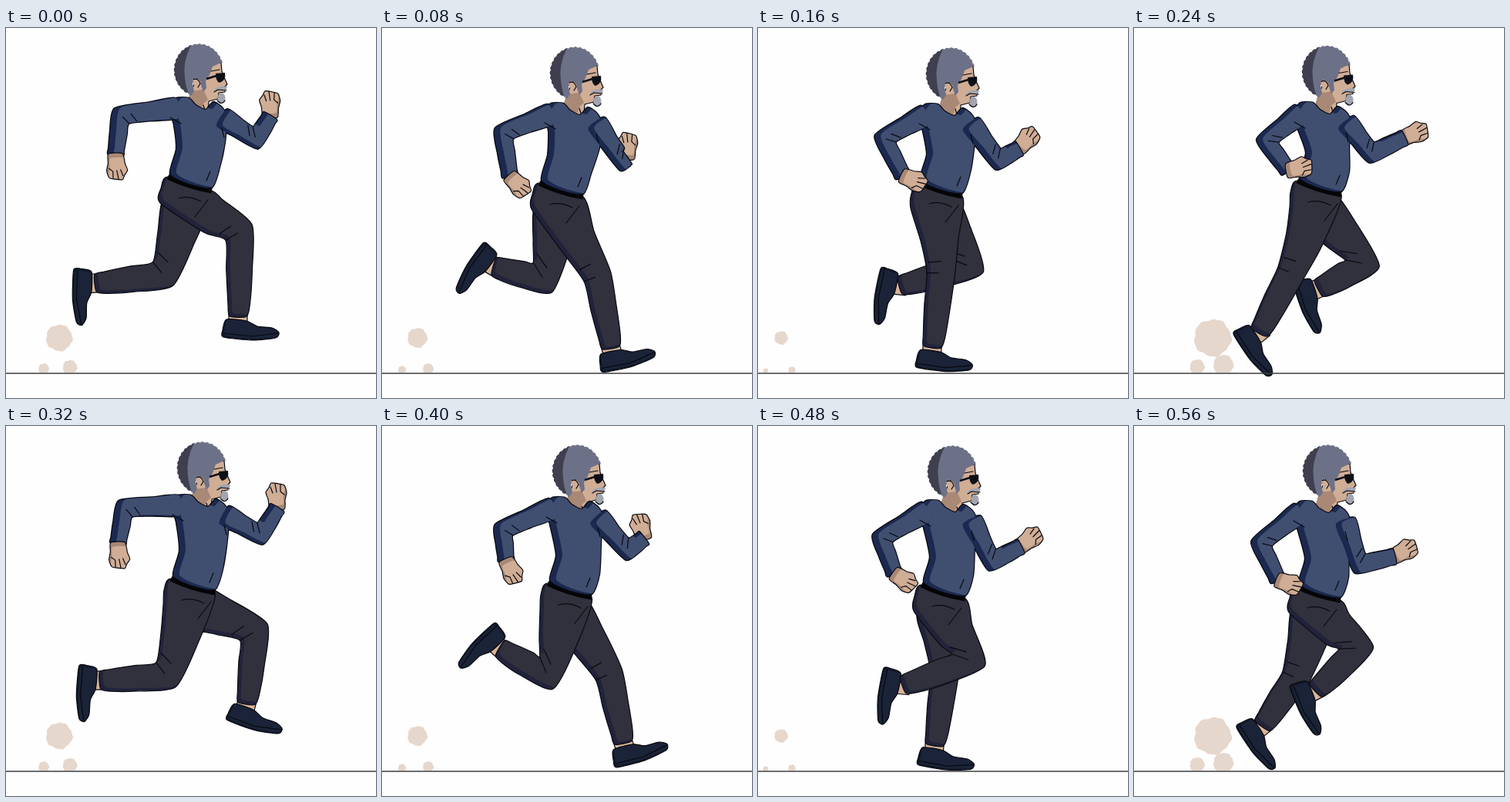
Animation of 480x480 px, one loop 0.64 s. Source, as an HTML page:

```html
<!DOCTYPE html>
<html lang="en">
<head>
<meta charset="utf-8">
<title>Running man</title>
<style>
html, body { margin: 0; height: 100%; overflow: hidden; background: #fefefe; }
svg { display: block; width: 100%; height: 100%; }
.pose { visibility: hidden; animation: show 640ms step-end infinite; animation-delay: calc(var(--i) * 80ms - 640ms); }
@keyframes show { 0% { visibility: visible; } 12.5%, 100% { visibility: hidden; } }
.ink { fill: none; stroke: #08090f; stroke-width: 1.2; stroke-linejoin: round; stroke-linecap: round; }
.rim { stroke-width: 2.4; }
.band { fill: none; stroke: #050507; stroke-width: 7; }
</style>
</head>
<body>
<svg id="stage" viewBox="0 0 480 480"></svg>
<script>
// Material: lit colour, shaded colour, offset of the lit copy.
const knit = ['#404e70', '#1b2950', 8, -1];
const cloth = ['#31313d', '#20233a', 5, -4];
const leather = ['#1a2337', '#10182a', 3, -2];
const skin = ['#d0ad95', '#a98875', 6, -2];

const stage = document.getElementById('stage');
let clips = 0, frames = 0;

const add = ([x, y], dx, dy) => [x + dx, y + dy];
const mix = (a, b, t) => [a[0] + (b[0] - a[0]) * t, a[1] + (b[1] - a[1]) * t];
const unit = (a, b) => {
  const l = Math.hypot(b[0] - a[0], b[1] - a[1]) || 1;
  return [(b[0] - a[0]) / l, (b[1] - a[1]) / l];
};

// Closed curve through the points, tight enough to keep cuffs crisp.
function curve(p, k = 0.11) {
  const at = i => p[(i + p.length) % p.length];
  const pull = (a, from, to) => add(a, (to[0] - from[0]) * k, (to[1] - from[1]) * k);
  return 'M' + p[0] + p.map((a, i) => {
    const b = at(i + 1);
    return `C${pull(a, at(i - 1), b)} ${pull(b, at(i + 2), a)} ${b}`;
  }).join('') + 'Z';
}

const fill = (d, color) => `<path d="${d}" fill="${color}"/>`;
const ink = (d, extra = '') => `<path class="ink ${extra}" d="${d}"/>`;

function shaded(d, [light, dark, dx, dy]) {
  const id = 'c' + clips++;
  return `<clipPath id="${id}"><path d="${d}"/></clipPath><g clip-path="url(#${id})">${fill(d, dark)}` +
    `<path d="${d}" fill="${light}" transform="translate(${dx} ${dy})"/></g>`;
}
const part = (d, material) => shaded(d, material) + ink(d);

// Both edges of a bent limb, from half widths at root, middle, joint, middle, cuff and end.
function limb(a, b, c, widths, folds = 0) {
  const d1 = unit(a, b), d2 = unit(b, c), sum = unit([0, 0], add(d1, ...d2));
  const bend = Math.sign(d1[0] * d2[1] - d1[1] * d2[0]);
  const miter = 1 / Math.max(0.68, sum[0] * d1[0] + sum[1] * d1[1]);
  const stations = [[a, d1], [mix(a, b, 0.5), d1], [b, sum], [mix(b, c, 0.45), d2], [mix(b, c, 0.85), d2], [c, d2]];
  const edge = side => stations.map(([p, d], i) => {
    const fold = i > 0 && i < 5 ? folds * Math.sin(i * 2.6 + side) : 0;
    const w = side * (widths[i] * (i === 2 && side === bend ? miter : 1) + fold);
    return add(p, -d[1] * w, d[0] * w);
  });
  const inner = edge(bend || 1)[2];
  return {
    back: edge(1),
    front: edge(-1).reverse(),
    crease: `M${inner}L${mix(inner, b, 0.8)}M${mix(inner, a, 0.16)}L${mix(b, a, 0.18)}`
  };
}

const placed = (p, angle, content) => `<g transform="translate(${p}) rotate(${angle})">${content}</g>`;

const shoeShape = curve([[-15, 4], [11, 6], [25, 13], [44, 15], [53, 21], [49, 28], [19, 31], [-19, 27], [-20, 18]]);
const shoe = (p, angle) => placed(p, angle,
  fill('M-12 -9H12V9H-12Z', '#d8b49b') + ink('M-12 -9V7M12 -9V8') +
  part(shoeShape, leather) + ink('M-18 22L18 26L52 22'));

const handShape = curve([[-2, -9], [11, -12], [20, -15], [26, -11], [32, -8], [31, 2], [29, 9], [20, 12], [10, 10], [-2, 9]]);
const hand = (p, angle) => placed(p, angle,
  part(handShape, skin) + ink('M27 -9L19 -6M31 -3L20 -1M30 4L21 4L17 9'));

function leg(hip, knee, ankle, angle, waist) {
  const { back, front, crease } = limb(hip, knee, ankle, [28, 24, 19, 16, 15, 11], 1.6);
  const outline = waist
    ? [waist.back, add(waist.back, -9, 15), add(waist.back, -10, 34), ...back.slice(1), ...front.slice(0, -1), waist.front]
    : [...back, ...front];
  return shoe(ankle, angle) + part(curve(outline), cloth) + ink(crease);
}

function hair(to) {
  let d = '';
  for (let a = 118; a <= to; a += 11.4) {
    const r = a * Math.PI / 180;
    const x = 250 + 31 * Math.cos(r), y = 54.5 + 33 * Math.sin(r);
    d += `${d ? 'A4.5 4.5 0 0 1 ' : 'M'}${x.toFixed(1)} ${y.toFixed(1)}`;
  }
  return d;
}

const faceShape = 'M255 48L279 45L280 56L283 64L287 73L283 77L284 83L276 84L275 92L263 95L262 108L252 112L236 97L241 80Z';
const headArt =
  fill(faceShape, '#d0ad95') + ink(faceShape) +
  fill('M240 82L256 80L262 93L256 98L252 112L235 97Z', '#a98875') +
  fill(hair(346) + 'L279 45L268 50L264 61L259 69L260 78L256 83L253 74L247 64L242 72L244 82L240 88Z', '#6d7187') +
  fill(hair(256) + 'L240 22Q229 44 232 64Q233 77 238 88Z', '#3f3f4f') +
  fill('M242 67Q249 63 253 71Q252 78 245 78Z', '#d0ad95') +
  '<ellipse cx="279.5" cy="91" rx="5" ry="7" fill="#a2a5b0"/>' +
  fill('M269 82Q274 74 287 76L285 82L278 80Z', '#a2a5b0') +
  ink('M243 67Q249 64 252 72L249 77M266 56L277 54M270 83L275 80L286 81M274 94Q280 101 284 94M256 100L258 107') +
  fill('M272 59L284 58Q286 68 277 71Q272 69 272 59Z', '#0d1018') +
  '<path d="M260 66L273 62" stroke="#0d1018" stroke-width="2.4"/>';

function blob(cx, cy, r) {
  const points = [];
  for (let a = 0; a < 6.28; a += 0.15) {
    const w = r * (1 + 0.04 * Math.sin(5 * a + 1) + 0.03 * Math.sin(11 * a));
    points.push([cx + w * Math.cos(a), Math.min(447, cy + w * Math.sin(a))]);
  }
  return fill('M' + points.join(' ') + 'Z', '#e6d7cc');
}
const dust = (x, size) => blob(x + 20, 402, 24 * size) +
  blob(x, 448 - 8.5 * size, 9.5 * size) + blob(x + 34, 448 - 11 * size, 13 * size);
const puffs = [[49, 0.71], [26, 0.53], [10, 0.36], [82, 1]];

function sweater(shoulder, hem, near, far) {
  const front = add(hem, 54, 18), s = (dx, dy) => add(shoulder, dx, dy);
  const sleeve = [13, 12, 12, 11, 10, 9.5];
  const arms = [limb(s(3, 0), near[0], near[1], sleeve), limb(s(61, 12), far[0], far[1], sleeve)];
  const body = curve([
    s(2, -13), s(18, -13), s(27, -4), s(40, 2), s(50, -8), s(62, 0), s(67, 12), s(65, 44),
    add(front, 10, -26), front, add(hem, 24, 13), hem, add(hem, 8, -32), s(-1, 22), s(-7, 0)
  ]);
  const shapes = [body, ...arms.map(a => curve([...a.back, ...a.front]))];
  return shapes.map(d => ink(d, 'rim')).join('') + shapes.map(d => shaded(d, knit)).join('') +
    ink(arms.map(a => a.crease).join('') +
      `M${s(-6, 12)}L${s(8, 20)}M${s(61, 26)}L${s(64, 38)}M${add(front, -2, -21)}L${add(front, -7, -9)}`);
}

// near and far hold: elbow, wrist, hand angle, knee, ankle, shoe angle.
function pose({ head, shoulder, hem, near, far }) {
  const hip = add(hem, 20, 37);
  const waist = { back: add(hem, -3, 4), front: add(hem, 54, 22) };
  const crotch = add(waist.front, -14, 14);
  const puff = puffs[frames % 4];
  stage.innerHTML += `<g class="pose" style="--i:${frames++}">` + dust(...puff) +
    leg(hip, ...far.slice(3)) + leg(hip, ...near.slice(3), waist) +
    ink(`M${add(waist.back, 14, 28)}Q${add(crotch, -16, -8)} ${crotch}M${add(waist.front, -5, 12)}L${add(crotch, -8, 20)}`) +
    `<path class="band" d="M${waist.back}Q${add(hem, 24, 17)} ${waist.front}"/>` +
    hand(far[1], far[2]) + `<g transform="translate(${head})">${headArt}</g>` +
    sweater(shoulder, hem, near, far) + hand(near[1], near[2]) + '</g>';
}

pose({
  head: [0, 0], shoulder: [219, 104], hem: [213, 189],
  near: [[149, 113], [142, 165], 88, [304, 264], [301, 374], 0],
  far: [[324, 145], [343, 114], -88, [205, 321], [116, 331], 86]
});
pose({
  head: [0, 4], shoulder: [217, 111], hem: [207, 197],
  near: [[157, 136], [166, 193], 48, [280, 322], [297, 415], -17],
  far: [[311, 173], [318, 168], -85, [211, 328], [145, 309], 120]
});
pose({
  head: [0, 5], shoulder: [215, 112], hem: [211, 196],
  near: [[163, 143], [188, 192], 25, [238, 318], [226, 414], 2],
  far: [[311, 172], [339, 156], -45, [276, 310], [184, 334], 96]
});
pose({
  head: [0, 2.5], shoulder: [214, 110], hem: [215, 194],
  near: [[171, 146], [200, 185], -10, [204, 318], [162, 395], 51],
  far: [[308, 163], [351, 142], -18, [301, 306], [239, 338], 66]
});
pose({
  head: [4, 0], shoulder: [222, 103], hem: [217, 194],
  near: [[154, 106], [145, 153], 88, [209, 325], [122, 330], 89],
  far: [[330, 142], [352, 106], -90, [324, 266], [312, 360], 14]
});
pose({
  head: [3, 4], shoulder: [219, 106], hem: [218, 200],
  near: [[157, 134], [161, 175], 66, [215, 325], [153, 288], 131],
  far: [[318, 162], [340, 145], -102, [295, 322], [313, 411], -20]
});
pose({
  head: [2, 5], shoulder: [216, 110], hem: [215, 202],
  near: [[160, 145], [177, 192], 36, [278, 305], [188, 336], 95],
  far: [[303, 176], [341, 156], -35, [243, 320], [229, 414], 4]
});
pose({
  head: [1, 4], shoulder: [213, 111], hem: [214, 204],
  near: [[164, 152], [187, 200], 22, [293, 288], [235, 343], 62],
  far: [[292, 180], [338, 169], -25, [210, 327], [166, 389], 51]
});

stage.innerHTML += '<path d="M0 448H480" stroke="#3c3c40" stroke-width="1.4"/>';
</script>
</body>
</html>
```
